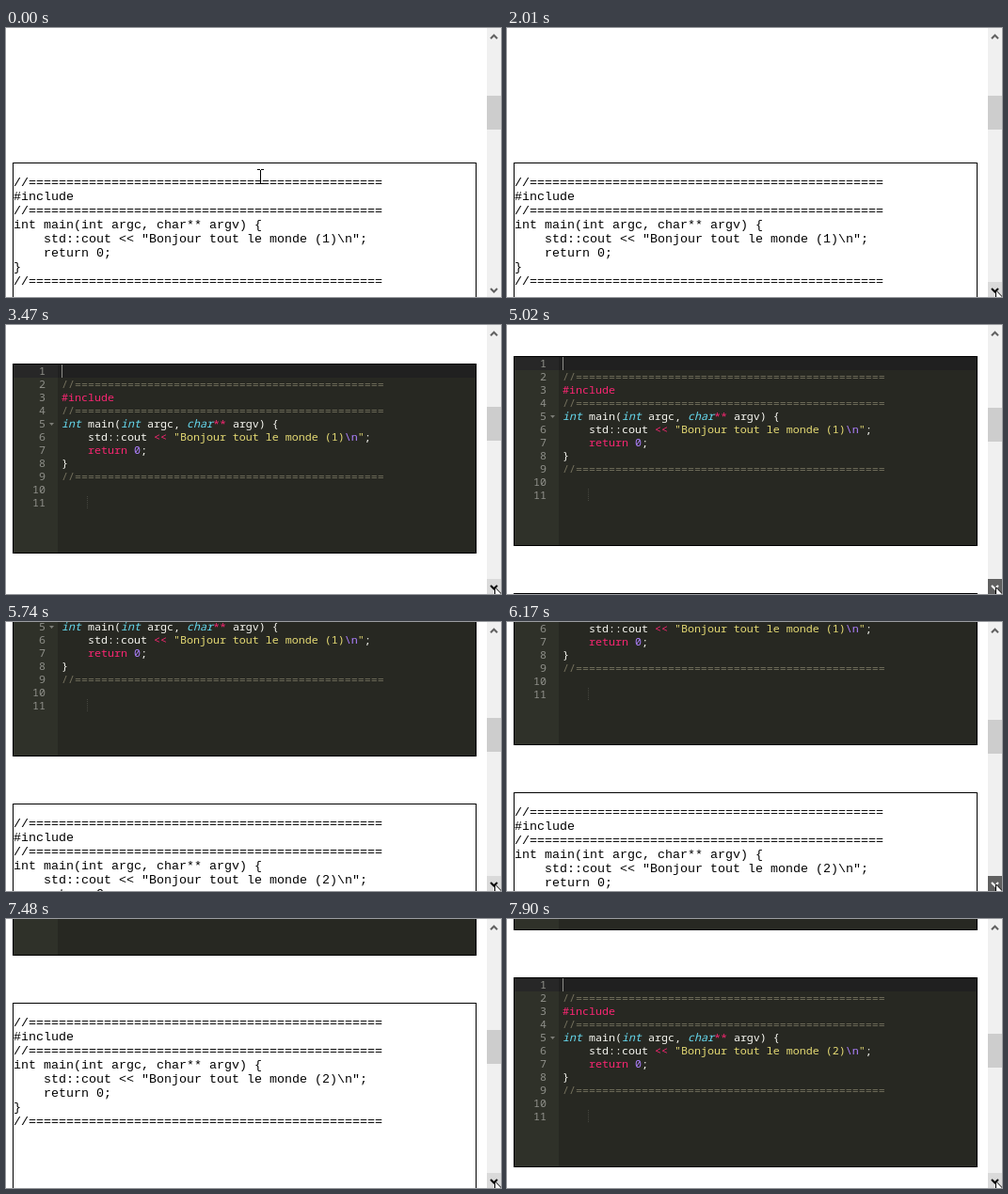
Animation of 526x286 px, one loop 8 s. Source, as an HTML page:

```html
<!DOCTYPE html>
<html lang="fr">
<head>
<meta charset="utf-8">
<title>Scrolling code blocks</title>
<style>
  html, body { margin: 0; width: 100%; height: 100%; overflow: hidden; background: #fff; }
  svg { display: block; width: 526px; height: 286px; }
  text { white-space: pre; }
  .plain text { font: 13.333px "Liberation Mono", monospace; fill: #000; }
  .editor text { font: 11.667px "Noto Sans Mono", monospace; fill: #f8f8f2; }
  .editor .number { fill: #8f908a; text-anchor: end; }
  .comment { fill: #75715e; }
  .keyword { fill: #f92672; }
  .type { fill: #66d9ef; font-style: italic; }
  .string { fill: #e6db74; }
  .constant { fill: #ae81ff; }
  .chevron { fill: none; stroke-width: 2; }
</style>
</head>
<body>
<svg viewBox="0 0 526 286">
  <g id="page"></g>
  <rect x="511" width="15" height="286" fill="#f0f0f0"/>
  <rect id="thumb" x="511" width="15" height="36" fill="#cdcdcd"/>
  <path class="chevron" d="M515 11.2 518.5 7.7 522 11.2" stroke="#606060"/>
  <rect id="button" x="511" y="270" width="15" height="16"/>
  <path id="down" class="chevron" d="M515 277 518.5 280.5 522 277"/>
  <path id="beam" d="M0 .5H3M4 .5H7M3.5 1V15M0 15.5H3M4 15.5H7" fill="none" stroke="#000"/>
  <path id="arrow" d="M.5.8V16.3L4.1 12.9 6.5 18.4 8.9 17.4 6.6 12H11.4Z" fill="#fff" stroke="#000"/>
</svg>
<script>
const DURATION = 8000;
const BOX = { width: 493, height: 202 };
const VIEW_HEIGHT = 286;
const REST = { fill: '#f0f0f0', stroke: '#606060' };
const HOVER = { fill: '#dadada', stroke: '#000' };
const PRESS = { fill: '#606060', stroke: '#fff' };

// time, scroll offset, button state, pointer left, pointer top
const steps = [
  [0, 0, REST, 267, 150],
  [500, 0, REST, 283, 153],
  [660, 0, REST, 329, 178],
  [810, 0, REST, 414, 232],
  [960, 0, REST, 420, 242],
  [1240, 0, REST, 456, 246],
  [1390, 0, REST, 521, 273],
  [1540, 0, HOVER, 521, 273],
  [1850, 0, HOVER, 522, 279],
  [2010, 0, HOVER, 519, 278],
  [2730, 30, HOVER, 519, 278],
  [2860, 51, HOVER, 519, 278],
  [3310, 51, PRESS, 519, 278],
  [3470, 102, HOVER, 519, 278],
  [5020, 110, PRESS, 519, 278],
  [5150, 153, HOVER, 519, 278],
  [5580, 153, PRESS, 519, 278],
  [5740, 202, HOVER, 519, 278],
  [5870, 204, HOVER, 519, 278],
  [6170, 214, PRESS, 519, 278],
  [6300, 255, HOVER, 519, 278],
  [7220, 255, PRESS, 519, 278],
  [7350, 285, HOVER, 519, 278],
  [7480, 306, HOVER, 519, 278],
  [7900, 333, HOVER, 519, 278]
].map(([time, scroll, button, x, y]) => ({ time, scroll, button, x, y }));

const $ = id => document.getElementById(id);

function make(parent, tag, attributes = {}, content = '') {
  const node = document.createElementNS('http://www.w3.org/2000/svg', tag);
  for (const name in attributes) node.setAttribute(name, attributes[name]);
  node.textContent = content;
  return parent.appendChild(node);
}

const rect = (parent, x, y, width, height, fill) =>
  make(parent, 'rect', { x, y, width, height, fill });

// Each line is a list of [text, class] pieces.
function codeLines(number) {
  const rule = [['//' + '='.repeat(47), 'comment']];
  return [
    [],
    rule,
    [['#include', 'keyword']],
    rule,
    [['int', 'type'], [' main('], ['int', 'type'], [' argc, '], ['char', 'type'],
      ['**', 'keyword'], [' argv) {']],
    [['    std::cout '], ['<<', 'keyword'], [' '],
      [`"Bonjour tout le monde (${number})`, 'string'], ['\\n', 'constant'],
      ['"', 'string'], [';']],
    [['    '], ['return', 'keyword'], [' '], ['0', 'constant'], [';']],
    [['}']],
    rule,
    [],
    []
  ];
}

function drawPlain(parent, lines) {
  const group = make(parent, 'g', { class: 'plain' });
  lines.forEach((line, i) =>
    make(group, 'text', { x: 8, y: 10 + 15 * i }, line.map(piece => piece[0]).join('')));
  return group;
}

function drawEditor(parent, lines) {
  const group = make(parent, 'g', { class: 'editor' });
  rect(group, 8, 1, 491, 200, '#272822');
  rect(group, 8, 1, 47, 200, '#2f3129');
  rect(group, 8, 1, 47, 14, '#272727');
  rect(group, 55, 1, 444, 14, '#202020');
  lines.forEach((line, i) => {
    const y = 12 + 14 * i;
    make(group, 'text', { class: 'number', x: 42, y }, i + 1);
    const text = make(group, 'text', { x: 59, y });
    for (const [content, style = ''] of line) make(text, 'tspan', { class: style }, content);
  });
  make(group, 'path', { d: 'M46 63H51L48.5 66Z', fill: '#7b7c76' });
  rect(group, 59, 1, 1, 14, '#8c8c88');
  make(group, 'path', { d: 'M86.5 141V155', stroke: '#45463f', 'stroke-dasharray': '1 1' });
  return group;
}

// Plays a held value per step, looping forever.
function play(element, valueAt) {
  const frames = steps.map(step =>
    ({ offset: step.time / DURATION, easing: 'step-end', ...valueAt(step) }));
  frames.push({ ...frames[frames.length - 1], offset: 1 });
  element.animate(frames, { duration: DURATION, iterations: Infinity });
}

const move = (x, y) => ({ transform: `translate(${x}px, ${y}px)` });
const show = visible => ({ visibility: visible ? 'visible' : 'hidden' });

[143, 395].forEach((top, i) => {
  const block = make($('page'), 'g', { transform: `translate(0 ${top})` });
  const lines = codeLines(i + 1);
  const plain = drawPlain(block, lines);
  const editor = drawEditor(block, lines);
  make(block, 'rect', {
    x: 7.5, y: 0.5, width: BOX.width - 1, height: BOX.height - 1, fill: 'none', stroke: '#000'
  });
  // A block turns into an editor once it is entirely in view.
  const isLoaded = step => top + BOX.height - step.scroll <= VIEW_HEIGHT;
  play(plain, step => show(!isLoaded(step)));
  play(editor, step => show(isLoaded(step)));
});

play($('page'), step => move(0, -step.scroll));
play($('thumb'), step => move(0, 72 + Math.floor(step.scroll / 6.53)));
play($('button'), step => ({ fill: step.button.fill }));
play($('down'), step => ({ stroke: step.button.stroke }));

const overText = step => step.time < 660;
play($('beam'), step => ({ ...move(step.x, step.y), ...show(overText(step)) }));
play($('arrow'), step => ({ ...move(step.x, step.y), ...show(!overText(step)) }));
</script>
</body>
</html>
```
